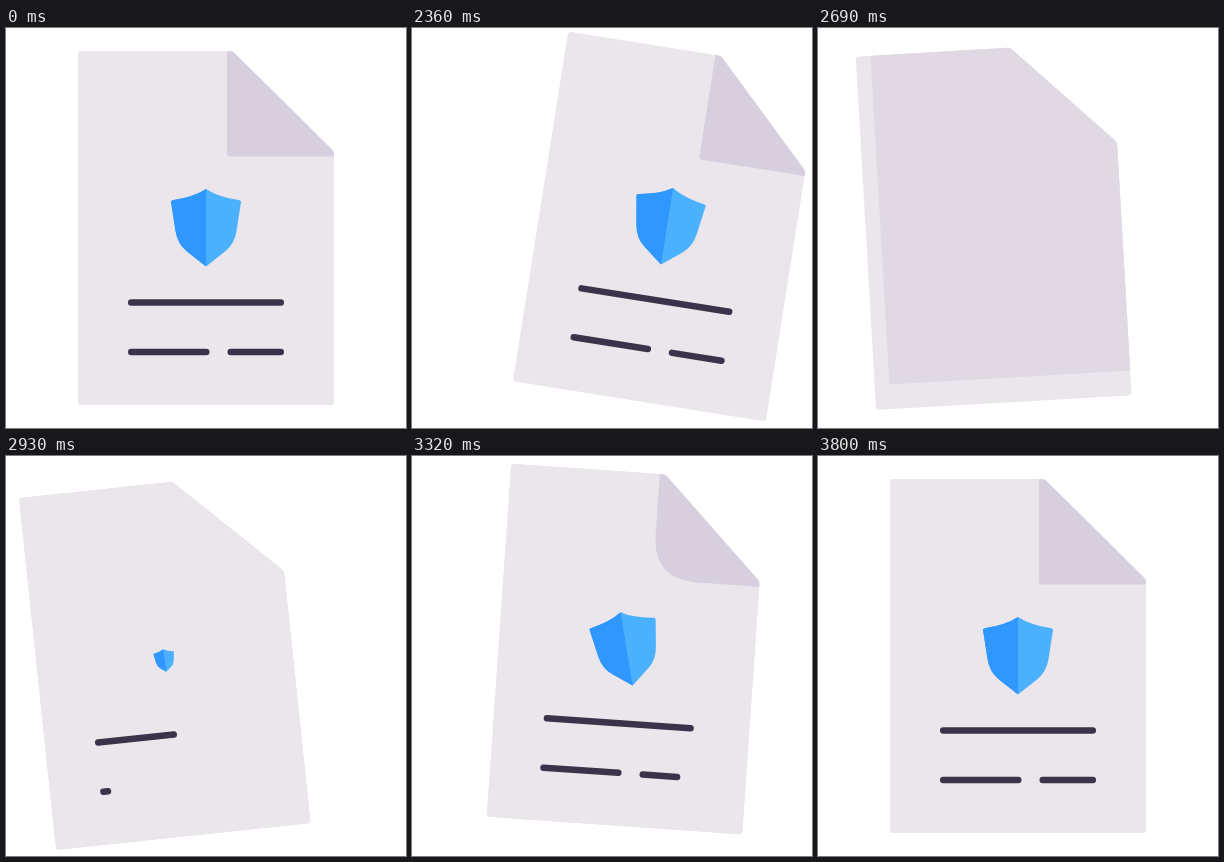
Animation, 400 px wide and 400 px high, one loop 3.83 s. Source, as an HTML page with a canvas:

```html
<!DOCTYPE html>
<html lang="en">
<head>
<meta charset="utf-8">
<title>Document shield</title>
<style>
  html, body { margin: 0; width: 100%; height: 100%; overflow: hidden; background: #fff; }
  canvas { display: block; width: 400px; height: 400px; }
</style>
</head>
<body>
<canvas id="stage"></canvas>
<script>
const LOOP = 3830, STEP = 30;
const PAPER = [235, 229, 236], FOLD = [215, 207, 222];
const INK = '#3b3349', BLUE = '#3097ff', SKY = '#4bb1fd';

const canvas = document.getElementById('stage');
const ctx = canvas.getContext('2d');
const ratio = window.devicePixelRatio || 1;
canvas.width = canvas.height = 400 * ratio;

const page = new Path2D('M75 23H224Q226.500 23 228 24.500L326 121.500Q328 123.500 328 126V374Q328 377 325 377H75Q72 377 72 374V26Q72 23 75 23Z');
const shield = new Path2D('M0 -39Q12 -31 33.500 -27.700Q35.200 -27.300 35 -26L30.500 3Q28.500 16 19 23.500L0 38.500L-19 23.500Q-28.500 16 -30.500 3L-35 -26Q-35.200 -27.300 -33.500 -27.700Q-12 -31 0 -39Z');

const mix = (a, b, p) => a + (b - a) * p;
const span = (t, from, to) => Math.min(1, Math.max(0, (t - from) / (to - from)));
const smooth = u => u * u * (3 - 2 * u);
const easeOut = u => 1 - (1 - u) ** 3;
const rgb = c => `rgb(${c.map(Math.round).join(',')})`;

// Keys are [time, value, arc]; arc bows the stretch that leads up to the key.
function track(keys, t) {
  if (t <= keys[0][0]) return keys[0][1];
  for (let i = 1; i < keys.length; i++) {
    const [t0, a] = keys[i - 1], [t1, b, arc = 0] = keys[i];
    if (t <= t1) {
      const p = smooth(span(t, t0, t1));
      return mix(a, b, p) + arc * 4 * p * (1 - p);
    }
  }
  return keys[keys.length - 1][1];
}

const SHIFT_X = [[2000, 0], [2360, 55], [2818, -43], [2900, -42], [3340, 15], [3800, 0]];
const SHIFT_Y = [[2000, 0], [2360, -1.5], [2818, 4.6, -9], [2900, 4.6], [3340, -7, 3], [3800, 0]];
const TILT = [[2000, 0], [2360, 9], [2818, -6.2], [2950, -6], [3430, 5.5], [3800, 0]];
const POP = [[2840, 0], [3110, 1.13], [3330, 0.955], [3560, 1]];
const SPIN = [[2840, 0], [3260, -14], [3720, 0]];

function drawShield(scale, deg) {
  if (scale <= 0) return;
  ctx.save();
  ctx.translate(200, 200);
  ctx.rotate(deg * Math.PI / 180);
  ctx.scale(scale, scale);
  ctx.fillStyle = SKY;
  ctx.fill(shield);
  ctx.clip(shield);
  ctx.fillStyle = BLUE;
  ctx.fillRect(-40, -45, 40, 90);
  ctx.restore();
}

function drawLine(x, y, length) {
  if (length <= 0) return;
  ctx.beginPath();
  ctx.moveTo(x, y);
  ctx.lineTo(x + length, y);
  ctx.stroke();
}

function drawLines(first, second) {
  ctx.strokeStyle = INK;
  ctx.lineWidth = 6.5;
  ctx.lineCap = 'round';
  const run = 125 * second;
  drawLine(125.25, 274.5, 149.5 * first);
  drawLine(125.25, 324, Math.min(75, run));
  drawLine(224.75, 324, run - 75);
}

function fillFold(color, trace) {
  ctx.save();
  ctx.clip(page);
  ctx.fillStyle = rgb(color);
  ctx.beginPath();
  trace();
  ctx.closePath();
  ctx.fill();
  ctx.restore();
}

// The flap sweeps over the sheet and becomes the new page.
function drawSweep(t) {
  const p = smooth(span(t, 2360, 2770));
  const x = mix(221, 72, p), y = mix(128.5, 377, p);
  const fade = smooth(span(t, 2550, 2850));
  const r = 3 * (1 - p);
  fillFold(FOLD.map((c, i) => mix(c, PAPER[i], fade)), () => {
    ctx.moveTo(x, 20);
    ctx.lineTo(x, y - r);
    ctx.quadraticCurveTo(x, y, x + r, y);
    ctx.lineTo(330, y);
    ctx.lineTo(330, 20);
  });
}

// A fresh corner curls in from the cut edge.
function drawCurl(t) {
  const open = easeOut(span(t, 2985, 3815));
  if (open <= 0) return;
  const reach = Math.min(1, open * 2);
  const flat = Math.min(0.97, Math.max(0, open * 2 - 1));
  const cx = mix(274.5, 221, reach), cy = mix(75.75, 128.5, reach);
  fillFold(FOLD, () => {
    ctx.moveTo(221, 23);
    ctx.lineTo(mix(221, cx, flat), mix(23, cy, flat));
    ctx.quadraticCurveTo(cx, cy, mix(328, cx, flat), mix(128.5, cy, flat));
    ctx.lineTo(328, 128.5);
    ctx.lineTo(330, 20);
    ctx.lineTo(221, 20);
  });
}

function draw(t) {
  ctx.setTransform(ratio, 0, 0, ratio, 0, 0);
  ctx.fillStyle = '#fff';
  ctx.fillRect(0, 0, 400, 400);
  ctx.translate(200 + track(SHIFT_X, t), 200 + track(SHIFT_Y, t));
  ctx.rotate(track(TILT, t) * Math.PI / 180);
  ctx.translate(-200, -200);
  ctx.fillStyle = rgb(PAPER);
  ctx.fill(page);

  if (t < 2740) {
    drawShield(1, 0);
    drawLines(1, 1);
    drawSweep(t);
  } else {
    drawSweep(t);
    drawCurl(t);
    drawLines(easeOut(span(t, 2750, 3605)), easeOut(span(t, 2920, 3720)));
    drawShield(track(POP, t), track(SPIN, t));
  }
}

function frame(now) {
  const t = now % LOOP;
  draw(Math.max(0, Math.floor((t + 10) / STEP) * STEP - 10));
  requestAnimationFrame(frame);
}
draw(0);
requestAnimationFrame(frame);
</script>
</body>
</html>
```
